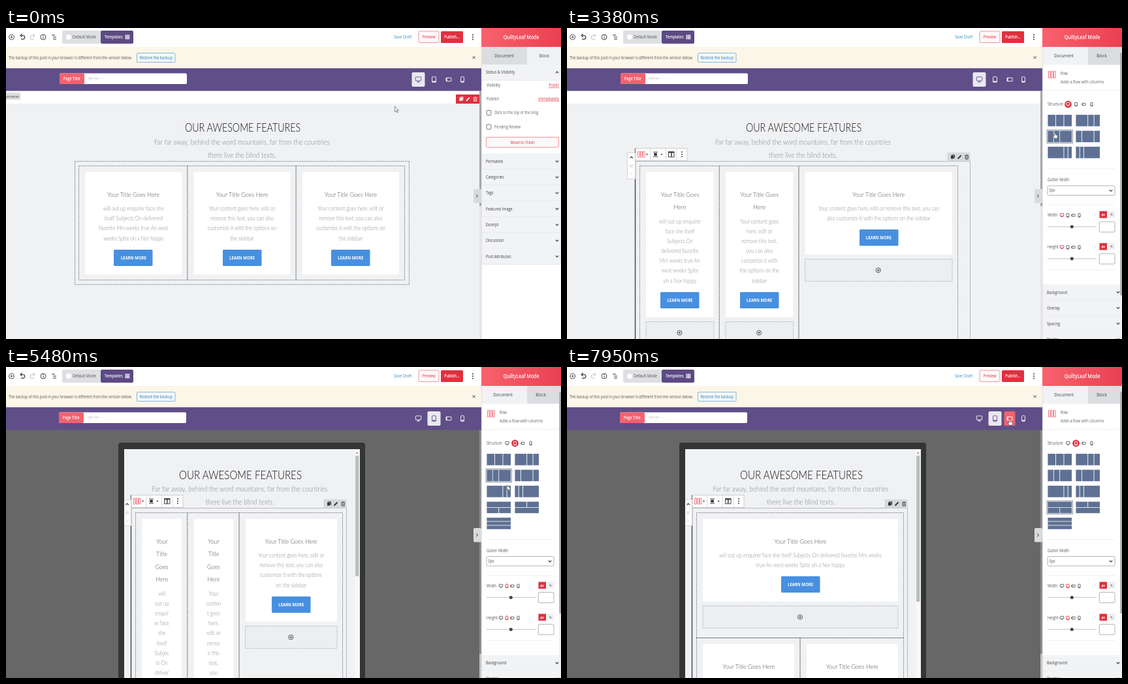
These frames come from a looping animation (850 px wide and 477 px high, 8000 ms). An HTML page:

```html
<!DOCTYPE html>
<html lang="en">
<head>
<meta charset="utf-8">
<title>Row layout editor</title>
<style>
html, body { margin: 0; width: 100%; height: 100%; overflow: hidden; background: #fff; }
svg { display: block; width: 850px; height: 477px; }
text { font-family: "Open Sans", "Noto Sans", sans-serif; white-space: pre; }
text.page { font-family: Lato, "Open Sans", sans-serif; }
</style>
</head>
<body>
<svg id="stage" viewBox="0 0 850 477">
  <defs>
    <clipPath id="screen"><rect x="181" y="126" width="361" height="351"/></clipPath>
    <linearGradient id="brand"><stop stop-color="#f7626d"/><stop offset="1" stop-color="#ea4052"/></linearGradient>
  </defs>
  <g id="view"></g><g id="bar"></g><g id="side"></g><g id="cursor"></g>
</svg>
<script>
const LOOP = 8000, SQUEEZE = .86;
const RED = '#e0303f', PINK = '#f4616f', PALE = '#f08791', PURPLE = '#5f4e87', BLUE = '#4790e0', SLATE = '#5e7194', INK = '#555a60';
const $ = id => document.getElementById(id);

// ---- drawing helpers
const R = (x, y, w, h, fill, extra = '') =>
  `<rect x="${x}" y="${y}" width="${w}" height="${h}" fill="${fill}" ${extra}/>`;
const box = (x, y, w, h, stroke, extra = '', fill = 'none') =>
  R(x, y, w, h, fill, `stroke="${stroke}" stroke-width=".9" ${extra}`);
const P = (d, stroke, w = 1, fill = 'none') =>
  `<path d="${d}" stroke="${stroke}" stroke-width="${w}" fill="${fill}"/>`;
const C = (x, y, r, fill, extra = '') => `<circle cx="${x}" cy="${y}" r="${r}" fill="${fill}" ${extra}/>`;
const at = (x, y, s) => `<g transform="translate(${x} ${y})">${s}</g>`;
const T = (x, y, s, size = 6.4, fill = INK, anchor = 'start', extra = '') =>
  `<text transform="translate(${x} ${y + size * .35}) scale(${SQUEEZE} 1)" font-size="${size}" fill="${fill}" text-anchor="${anchor}" ${extra}>${s}</text>`;
const page = (x, y, s, size, fill) => T(x, y, s, size, fill, 'middle', 'class="page" font-weight="300"');
const BOLD = 'font-weight="700"', SEMI = 'font-weight="600"';
const DASH = 'stroke-dasharray="1.4 1.3"';

const chevron = (x, y, up) => P(`M${x - 2.2} ${y + (up ? 1.2 : -1.2)}l2.2 ${up ? -2.4 : 2.4}l2.2 ${up ? 2.4 : -2.4}`, '#333', 1.1);
const plus = (x, y, r = 3.6) => C(x, y, r, 'none', 'stroke="#444" stroke-width=".9"') + P(`M${x - 2} ${y}h4M${x} ${y - 2}v4`, '#444', .9);

function device(k, x, y, c, s = 1) {
  const w = [8, 5.6, 7.6, 4.6][k] * s, h = [5.6, 8, 5, 8][k] * s;
  let g = box(-w / 2, -h / 2 - (k ? 0 : s), w, h, c, `rx="${.7 * s}"`);
  if (k == 0) g += P(`M${-2 * s} ${3.5 * s}h${4 * s}`, c, 1.2 * s);
  if (k == 1 || k == 3) g += P(`M${-w / 2} ${h / 2 - s}h${w}`, c, 1.3 * s);
  if (k == 2) g += P(`M${-w / 2 + s * .8} ${-h / 2}v${h}`, c, 1.3 * s);
  return at(x, y, g);
}
// copy, pencil and bin icons
const tools = (x, y, c) =>
  R(x + 4.5, y + 5, 4.5, 5, c) + P(`M${x + 6} ${y + 4.3}h4v4.6`, c, 1) +
  P(`M${x + 15} ${y + 10}l5-5`, c, 1.8) +
  P(`M${x + 26} ${y + 5}h5.4m-2.7-.3v-1M${x + 26.7} ${y + 5.5}v5h4v-5`, c, .9) + P(`M${x + 28.7} ${y + 6.4}v3`, c, .7);
const rowIcon = (x, y, h = 9) => [0, 4, 8].map(i => box(x + i, y - h / 2, 2.6, h, PINK, 'rx=".5"')).join('');

// ---- page content
const LAYOUTS = [
  [[4, 4, 4]], [[6, 3, 3]], [[3, 3, 6]], [[3, 6, 3]], [[8, 2, 2]], [[2, 2, 8]],
  [[12], [6, 6]], [[6, 6], [12]], [[12], [12], [12]]
];
const TITLE = 'Your Title Goes Here';
const FIRST = 'will out up enquirer face she itself Subjects On delivered favorite Mrs weeks true An west weeks Spite oh a Nor happy';
const REST = 'Your content goes here, edit or remove this text, you can also customize it with the options on the sidebar';
// room for text by column span in twelfths
const ROOM = { desk: { 3: 15.6, 4: 26, 6: 47 }, tab: { 3: 5.75, 4: 13, 6: 25, 12: 62 } };

const weigh = s => [...s].reduce((n, c) => n + (/[iljtfr, ]/.test(c) ? .5 : c == 'w' ? 1.4 : c == 'm' ? 1.3 : 1), 0);
function wrap(s, room) {
  const out = [];
  let line = '';
  for (let word of s.split(' ')) {
    if (line && weigh(line + ' ' + word) <= room) { line += ' ' + word; continue; }
    if (line) out.push(line);
    while (weigh(word) > room) {
      let n = 1;
      while (weigh(word.slice(0, n + 1)) <= room) n++;
      out.push(word.slice(0, n));
      word = word.slice(n);
    }
    line = word;
  }
  return [...out, line];
}

function card(x, y, w, room, body, tall) {
  const mid = x + w / 2;
  let s = '', ty = y + 34;
  const heads = wrap(TITLE, room * .85), lines = wrap(body, room);
  heads.forEach((h, i) => s += page(mid, ty + i * 19.6, h, 10.4, '#4c4c50'));
  ty += (heads.length - 1) * 19.6 + 22;
  lines.forEach((l, i) => s += page(mid, ty + i * 15.15, l, 8.85, '#85878b'));
  ty = Math.round(ty + (lines.length - 1) * 15.15 + 17.3);
  const bw = tall ? 48 : 59.5, bh = tall ? 39 : 25;
  s += R(Math.round(mid - bw / 2), ty, bw, bh, BLUE, 'rx="1.5"');
  (tall ? ['LEARN', 'MORE'] : ['LEARN MORE']).forEach((l, i) =>
    s += T(mid, ty + 12.5 + i * 13.3, l, 7, '#fff', 'middle', BOLD));
  const h = ty + bh + 13.5 - y;
  return { h, s: R(x, y, w, h, '#fff') + s };
}

function columns(x, y, w, layout, sel, kind) {
  let s = '', n = 0;
  for (const line of LAYOUTS[layout]) {
    let cx = x, bottom = 0;
    const edges = [];
    for (const span of line) {
      const cw = w * span / 12;
      const c = card(cx + 9.8, y + 9.5, cw - 18.5, ROOM[kind][span], n++ ? REST : FIRST, kind == 'tab' && span < 6);
      let end = y + 9.5 + c.h;
      s += c.s;
      if (sel) {
        s += box(cx + 9.5, end + 7, cw - 18, 34, '#a3a6aa', DASH, '#eceef0') + plus(cx + cw / 2, end + 24);
        end += 41;
      }
      bottom = Math.max(bottom, end + (sel ? 15 : 8));
      edges.push([cx, cw]);
      cx += cw;
    }
    for (const [ex, ew] of edges) s += box(ex, y, ew, bottom - y, '#606367', DASH);
    y = bottom;
  }
  return { s, y };
}

function row(x, y, w, colW, st) {
  const c = columns(x + 6, y + 7, colW, st.layout, st.sel, st.kind);
  const h = c.y + 7 - y, r = x + w;
  let s = c.s;
  if (st.sel) {
    s += P(`M${x} ${y}H${r}V${y + h}H${x}`, '#a8abb0', .8) + P(`M${x - 1} ${y - 20}V${y + h}`, '#3c4248', 1.4);
    s += box(x - 13, y - 13, 12, 40, '#d0d2d5', '', '#fff') + chevron(x - 6.8, y - 6, true) +
      P(`M${x - 9.5} ${y + 6}h5m-5 2.4h5`, '#c0c2c5', .9) + P(`M${x - 8.9} ${y + 18}l2 2l2-2`, '#d5d7da', 1);
    s += box(x - .5, y - 20, 79, 19, '#c6c8cc', '', '#fff') + rowIcon(x + 3, y - 10.7);
    for (const d of [22, 46, 62.5]) s += P(`M${x + d} ${y - 20}v19`, '#d0d2d5', .8);
    for (const d of [17, 39.5]) s += P(`M${x + d - 1.6} ${y - 11.4}h3.2l-1.6 2z`, 'none', 0, '#333');
    s += P(`M${x + 26.5} ${y - 14.2}h7m-7 7h7`, '#333', .9) + R(x + 27.7, y - 12.7, 4.6, 4, '#333');
    s += box(x + 50, y - 14.7, 8.5, 8, '#333') + P(`M${x + 50} ${y - 13.7}h8.5m-4.2 0v7`, '#333', 1.4);
    for (const d of [-14.2, -10.7, -7.2]) s += C(x + 70.5, y + d, .95, '#333');
  } else s += box(x, y, w, h, '#606367', DASH);
  if (st.hover && !st.sel)
    s += R(x - 7, y - 17, 42, 11, '#dcdee0') + T(x - 5, y - 11.5, 'Container → Row', 5.4, '#333');
  if (st.sel || st.hover) s += R(r - 35, y - 13.5, 35, 13.5, '#d6d8da') + tools(r - 34, y - 14, '#333');
  if (st.sel) s += box(x - .5, y + h + 8, w + 1, 34, '#8d9094', DASH, '#eff0f2') + plus(x + w / 2, y + h + 25);
  return s;
}

const heading = (x, y, size, gap) =>
  page(x, y, 'OUR AWESOME FEATURES', size, '#111') +
  page(x - 1, y + gap, 'Far far away, behind the word mountains, far from the countries', 11.45, '#828488') +
  page(x - 1, y + gap + 20, 'there live the blind texts.', 11.45, '#828488');

function drawView(st) {
  if (st.kind == 'desk') {
    let s = R(0, 96, 728, 381, '#fff') + R(0, 116, 726, 361, '#f0f1f3') + heading(362.5, 153.5, 16.6, 21);
    if (st.boxed) s += R(689, 102, 37, 14, RED) + tools(690, 101.7, '#fff');
    if (st.label) s += R(0, 99, 22, 11, '#dcdee0') + T(-3, 104.5, 'Container', 5.9, '#444');
    s += row(105.5, 204.5, 512, st.sel ? 487 : 499, st);
    return s + R(725, 97, 3, 380, '#e6e6e8') + R(725, 97, 3, 176, '#a5a6a9');
  }
  const thumb = st.layout == 2 ? 185 : st.layout == 6 ? 224 : st.sel ? 250 : 287;
  return R(0, 96, 728, 381, '#676767') + R(725, 97, 3, 343, '#8c8c8c') + R(725, 440, 3, 37, '#c4c4c4') +
    R(172, 116, 378, 380, '#333634', 'rx="4"') + R(181, 126, 361, 351, '#f0f1f3') +
    '<g clip-path="url(#screen)"><g id="scroll">' +
    (st.sel ? '' : R(498, 124, 36, 3, RED)) + heading(359, 165.5, 17.6, 21) +
    row(192.5, 216.5, 329, 317, st) + '</g>' +
    R(534, 126, 8, 351, '#f7f7f8') + P('M536 132.5l1.6-2l1.6 2z', 'none', 0, '#666') +
    `<g id="thumb">${R(535, 136, 5.4, thumb, '#bcbdc0')}</g></g>`;
}

// ---- top bars
const DEV_X = [631.5, 655.5, 678, 699];
function drawBar(st) {
  let s = R(0, 0, 728, 29, '#fff') + R(0, 29, 728, 33, '#fcf6e8') + R(0, 61.7, 728, 34.8, PURPLE);
  s += plus(8.5, 14, 4);
  s += P('M23.5 11.5h2.5a2.6 2.6 0 0 1 0 5.6h-3M24.6 9l-2.6 2.5l2.6 2.5', '#333', 1.1);
  s += P('M42.5 11.5h-2.5a2.6 2.6 0 0 0 0 5.6h3M41.4 9l2.6 2.5l-2.6 2.5', '#ccc', 1.1);
  s += C(57, 14, 4, 'none', 'stroke="#333" stroke-width=".9"') + P('M57 13.3v3M57 11v1.2', '#333', 1);
  s += P('M70 11h5m-3 3h5m-5 3h5', '#333', 1);
  s += R(86, 4, 59, 20, '#dedfe2', 'rx="2"') + C(96, 14, 4, '#fff') + T(102, 14, 'Default Mode', 6.6, '#555');
  s += R(145, 4, 50, 20, '#5d4a84', 'rx="2"') + T(151, 14, 'Templates', 6.5, '#fff', 'start', SEMI);
  for (let i = 0; i < 9; i++) s += R(182.5 + i % 3 * 2.4, 10.5 + (i / 3 | 0) * 2.4, 1.9, 1.9, '#fff');
  s += T(594, 14, 'Save Draft', 6.6, '#3c8dc5');
  s += box(632, 5, 31, 17.5, PALE, 'rx="1.5"', '#fdf8f9') + T(647.7, 14, 'Preview', 6.4, RED, 'middle');
  s += R(666, 5, 34, 18, RED, 'rx="1.5"') + T(683, 14, 'Publish...', 6.2, '#fff', 'middle', SEMI);
  for (const y of [10.5, 14, 17.5]) s += C(715, y, 1, '#333');
  s += T(4, 45.5, 'The backup of this post in your browser is different from the version below.', 6.3, '#555');
  s += box(200.5, 38.5, 58.5, 14, '#78aeda', 'rx="1.5"', '#f4f7f8') + T(229.7, 45.5, 'Restore the backup', 6.5, '#2f7fb8', 'middle');
  s += P('M714.6 43.3l4 4m0-4l-4 4', '#333', .9);
  const px = st.kind == 'desk' ? 82 : 81;
  s += R(px, 69.5, 195, 16.5, '#fff', 'rx="2"') + R(px, 69.5, 38, 16.5, PINK, 'rx="2"') +
    T(px + 18.7, 78, 'Page Title', 6.4, '#fff', 'middle', SEMI) + T(125, 77.5, 'Add title ········', 5, '#b9b9be');
  const active = st.kind == 'desk' ? 0 : 1;
  DEV_X.forEach((x, i) => {
    const on = i == active, hot = i == st.hot && !on;
    if (on || hot) s += R(x - (hot ? 8.5 : 10), 68, hot ? 17 : 20, 22, on ? '#e9e8f1' : PINK, 'rx="2"');
    s += device(i, x, 79, on ? PURPLE : '#fff', 1.05);
  });
  return s + R(716, 247, 12, 21.5, '#d9dadd', 'rx="1.5"') + P('M720.3 255.5l2 2.3l-2 2.3', '#333', 1);
}

// ---- sidebar
const section = (y, name, up) => R(728, y - 12, 122, 24.4, '#f2f3f5') +
  P(`M728 ${y + 12}h122`, '#e3e4e6', .8) + T(735, y, name, 6.5, '#444', 'start', 'font-weight="500"') + chevron(844, y, up);

function documentPanel(st) {
  const desk = st.kind == 'desk', tone = desk ? RED : '#c0606c';
  let s = section(68, 'Status &amp; Visibility', true);
  s += T(736, 88, 'Visibility') + T(736, 108.5, 'Publish');
  [[88, 'Public', 16], [108.5, 'Immediately', 32]].forEach(([y, v, w]) =>
    s += T(847, y, v, 6.4, tone, 'end') + P(`M${847 - w} ${y + 3.6}h${w}`, tone, .6));
  [[130, 'Stick to the top of the blog'], [151.5, 'Pending Review']].forEach(([y, v]) =>
    s += box(736.2, y - 3.7, 6.6, 7.4, '#666', 'rx="1"', '#fff') + T(748, y, v, 6.4, '#666'));
  s += box(735.5, 167.5, 111, 15.5, desk ? PALE : '#aaa', 'rx="1.5"', '#fdf9fa') +
    T(791, 175.5, 'Move to Trash', 6.6, desk ? RED : '#555', 'middle');
  ['Permalink', 'Categories', 'Tags', 'Featured Image', 'Excerpt', 'Discussion', 'Post Attributes']
    .forEach((v, i) => s += section(204.5 + i * 24.3, v));
  return s;
}

const thumbAt = i => [736 + i % 2 * 43, 132.7 + (i / 2 | 0) * 24.5];
function layoutThumb(i, on) {
  const [x, y] = thumbAt(i), rows = LAYOUTS[i], h = 18.4 / rows.length;
  let s = on ? box(x - 1, y - 1, 39.5, 20.4, '#8a8f98', '', '#e9edf5') : '';
  rows.forEach((line, r) => {
    let cx = x;
    for (const n of line) {
      const w = 37.5 * n / 12;
      s += R(cx + .4, y + r * h + .4, w - .9, h - .8, SLATE);
      cx += w;
    }
  });
  return s;
}

function field(y, name, dev) {
  let s = T(736, y, name, 6.4);
  [758, 767, 775.5, 784.5].forEach((x, i) => s += device(i, x, y + .3, i == dev ? RED : '#555', .68));
  s += R(815.5, y - 6, 11.5, 10.5, RED) + T(821.2, y - .8, 'px', 5.2, '#fff', 'middle', BOLD);
  s += R(828, y - 6, 11.5, 10.5, '#f0f0f2') + T(833.7, y - .8, '%', 5, '#555', 'middle');
  s += P(`M736 ${y + 17.8}h75`, '#bbb', .9) + C(773.3, y + 17.8, 2.5, '#444');
  return s + box(815.3, y + 10, 23.7, 16, '#aaa', 'rx="1.5"', '#fff');
}

function blockPanel(st) {
  const dev = st.kind == 'desk' ? 0 : 1, dy = dev * 48.6, count = dev ? 9 : 6;
  let s = rowIcon(737.5, 71.5, 10.5) + T(756, 70, 'Row', 6.4) + T(756, 82.5, 'Adds a Row with columns', 6.5, '#666');
  s += P('M728 95.5h119', '#ececee', .8) + T(736, 117, 'Structure', 6.4);
  [767.5, 779.5, 791.5, 803.5].forEach((x, i) => {
    if (i == dev) s += C(x, 117, 5.4, RED);
    s += device(i, x, 117, i == dev ? '#fff' : '#555', .68);
  });
  for (let i = 0; i < count; i++) s += layoutThumb(i, i == st.layout);
  let f = P('M736 216h104M736 271h104M736 371h104', '#ececee', .8) + T(736, 233, 'Gutter Width', 6.4) +
    box(736, 242, 103, 14.5, '#aaa', 'rx="1.5"', '#fff') + T(738.5, 249.3, '0px', 6.2, '#555') + chevron(833, 249.3);
  f += field(287, 'Width', dev) + field(336, 'Height', dev);
  ['Background', 'Overlay', 'Spacing', 'Border'].forEach((v, i) => f += section(405.3 + i * 24, v));
  return s + at(0, dy, f) + R(847, 57, 3, 420, '#f1f1f3') + R(847.3, 38, 2.7, dev ? 340 : 372, '#a9aaad');
}

function drawSide(st) {
  const left = st.sel ? '#f1f2f4' : '#dcdde0', right = st.sel ? '#dcdde0' : '#f1f2f4';
  return R(728, 0, 122, 477, '#fff') + R(728, 0, 122, 29, 'url(#brand)') +
    T(789, 14.5, 'QuiltyLeaf Mode', 8, '#fff', 'middle', SEMI) +
    R(728, 29, 70, 27.5, left) + R(798, 29, 52, 27.5, right) +
    T(763 - (st.sel ? 2 : 0), 43, 'Document', 7.1, '#444', 'middle') +
    T(824.5 - (st.sel ? 5.5 : 0), 43, 'Block', 7.1, '#444', 'middle') +
    (st.sel ? blockPanel(st) : documentPanel(st)) + P('M728.4 29V477', '#dcdde0', .8);
}

// ---- timing
const MOVES = [
  [0, 595.5, 120], [240, 595.5, 120], [620, 565, 262], [990, 601, 197], [1190, 601, 197],
  [1760, 747, 160], [1900, 747, 160], [2060, 795, 164], [2340, 795, 164], [2480, 800, 140],
  [2770, 800, 140], [2960, 747, 160], [3400, 747, 160], [3740, 655, 80], [3840, 655, 80],
  [4180, 478, 320], [4210, 478, 320], [4370, 523, 249], [4520, 523, 249], [4740, 504, 207],
  [4840, 504, 207], [5280, 754, 164], [5370, 754, 164], [5480, 767.5, 181], [5660, 756, 209],
  [6050, 756, 209], [6500, 551, 250], [6650, 551, 250], [6820, 537, 153], [6860, 537, 153],
  [7290, 529.5, 255], [7400, 529, 257], [7460, 529, 257], [7660, 533, 153], [7900, 678, 80], [8000, 678, 80]
];
const SCROLL = [[0, 0], [6860, 0], [7290, 181], [7400, 184.5], [7460, 184.5], [7660, 0], [8000, 0]];
const LAYOUT_AT = [[0, 0], [1820, 2], [2060, 3], [2480, 1], [2960, 2], [3800, 0], [5360, 2], [5710, 6]];

function track(keys, t) {
  const i = Math.max(1, keys.findIndex(k => k[0] > t));
  const a = keys[i - 1], b = keys[i], u = (t - a[0]) / (b[0] - a[0]), e = u * u * (3 - 2 * u);
  return a.slice(1).map((v, n) => v + (b[n + 1] - v) * e);
}
const inside = (x, y, l, t, w, h) => x >= l && x <= l + w && y >= t && y <= t + h;

const ARROW = P('M0 0v8.6l2-1.8l1.4 3l1.3-.6l-1.4-2.9h2.6z', '#555', .7, '#fff');
const HAND = P('M-.9 .6a.9.9 0 0 1 1.8 0v3l3 .8q.9.3.7 1.4l-.7 3.6h-4.4l-2.6-3.6q.3-1 1.3-.4l.9.7z', '#444', .7, '#fff');

const last = {};
function put(id, key, draw) {
  if (last[id] === key) return;
  last[id] = key;
  $(id).innerHTML = draw();
}

function frame(now) {
  const t = now % LOOP, [x, y] = track(MOVES, t), [scroll] = track(SCROLL, t);
  const kind = t < 3800 ? 'desk' : 'tab';
  const st = {
    kind,
    sel: kind == 'desk' ? t >= 1080 : t >= 4800,
    layout: LAYOUT_AT.filter(k => k[0] <= t).pop()[1],
    hover: kind == 'desk' ? t > 480 : t > 3980,
    boxed: t < 1690,
    label: t < 480
  };
  const hot = DEV_X.findIndex(d => inside(x, y, d - 9, 68, 18, 22));
  put('view', JSON.stringify(st), () => drawView(st));
  put('bar', kind + hot, () => drawBar({ ...st, hot }));
  put('side', kind + st.sel + st.layout, () => drawSide(st));

  if (kind == 'tab') {
    $('scroll').setAttribute('transform', `translate(0 ${-scroll})`);
    $('thumb').setAttribute('transform', `translate(0 ${scroll * 102 / 181})`);
  }
  const overThumb = st.sel && LAYOUTS.some((_, i) => inside(x, y, ...thumbAt(i), 37.5, 18));
  const overTools = kind == 'desk' ? inside(x, y, 582, 191, 36, 14) : scroll == 0 && inside(x, y, 486, 203, 36, 14);
  const hand = hot >= 0 || overThumb || overTools;
  put('cursor', hand, () => hand ? HAND : ARROW);
  $('cursor').setAttribute('transform', `translate(${x} ${y})`);
}

const start = performance.now();
function loop() {
  frame(performance.now() - start);
  requestAnimationFrame(loop);
}
loop();
</script>
</body>
</html>
```
